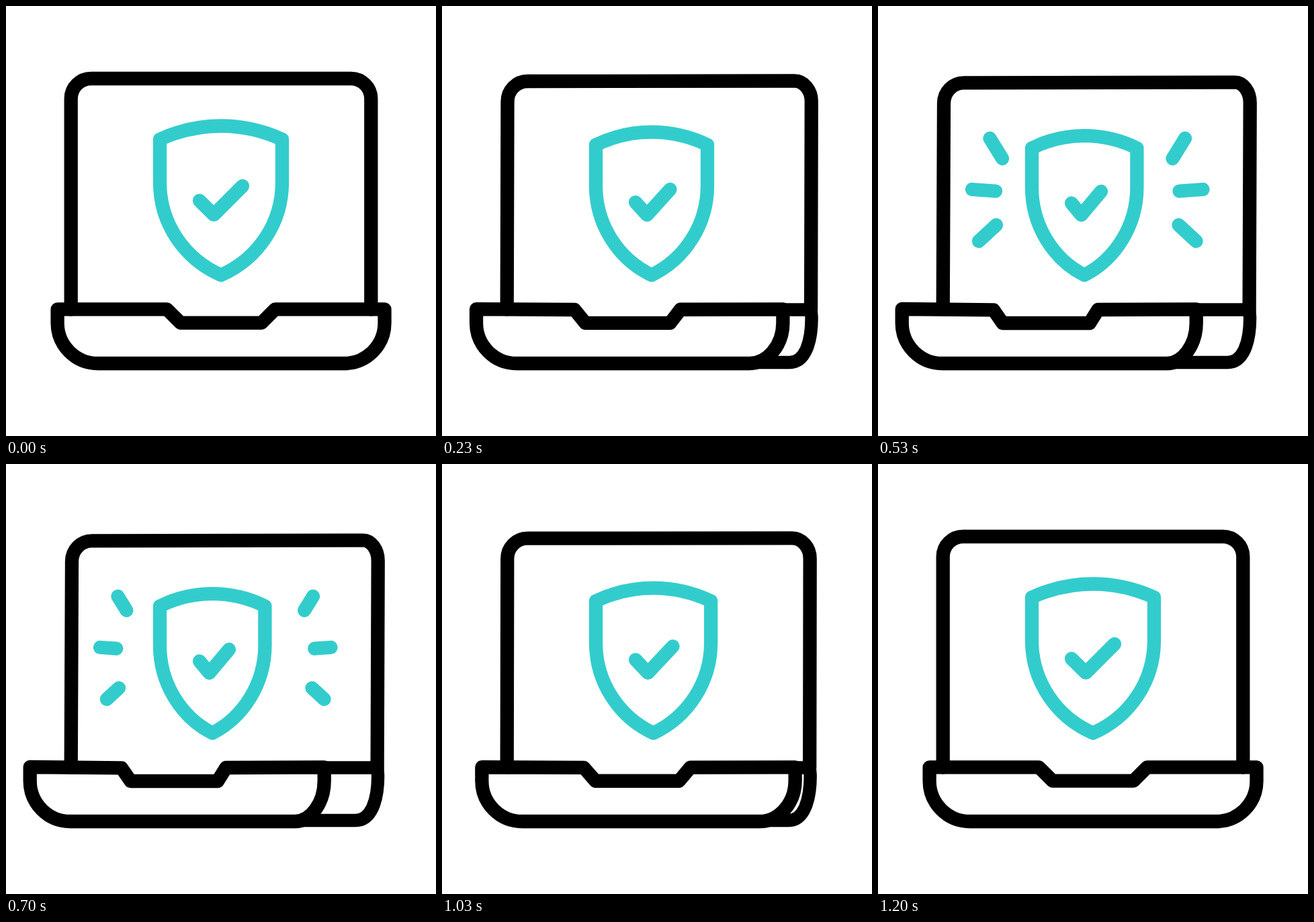
Write an HTML page that moves like this. It is 640x640 px and loops after 1670 ms.

```html
<!DOCTYPE html>
<html lang="en">
<head>
<meta charset="utf-8">
<title>Secure laptop</title>
<style>
  html, body { margin: 0; width: 100%; height: 100%; overflow: hidden; background: #fff; }
  svg { display: block; width: 100vw; height: 100vh; }
  path { fill: none; stroke: #000; stroke-width: 20.3; stroke-linecap: round; stroke-linejoin: round; }
  #back { stroke-width: 19.4; }
  #tray { fill: #fff; }
  .teal, .teal path { stroke: #3cc; }
</style>
</head>
<body>
<svg viewBox="0 0 640 640">
  <path id="back"/>
  <path id="tray"/>
  <path id="screen"/>
  <path id="shield" class="teal"/>
  <path id="check" class="teal"/>
  <path id="rays" class="teal"/>
</svg>
<script>
const LOOP = 1670, STEP = 100 / 3;

// Each part: path facing front, path turned aside (same commands).
const poses = {
  back: [
    'M420 452 L543.3 452 L544.3 464 C544.3 500 535 530.5 513 530.5 L420 530.5',
    'M420 452 L552.8 452 L553.6 464 C553.6 500 544 530.5 520 530.5 L420 530.5'],
  tray: [
    'M76.6 451.4 L239.5 451.4 L259.8 471.6 L380.3 471.6 L400.5 451.4 L563.5 451.4 L563.5 471.8 C563.5 505 536.6 532 503.5 532 L136.6 532 C103.5 532 76.6 505 76.6 471.8 Z',
    'M35.7 451 L172 452.4 L185.5 472 L315 472 L327.5 452 L473.7 451.4 L473.7 471.8 C473.7 505 453 532 430 532 L95.5 532 C62.5 532 35.7 505 35.7 471.8 Z'],
  screen: [
    'M96.7 451.4 L96.7 138 C96.7 121.4 110 108 126.7 108 L513.3 108 C530 108 543.3 121.4 543.3 138 L543.3 451.4',
    'M96.7 451.4 L98 145 C98 128 111 114.4 128 114.4 L531.5 113.6 C543.5 113.6 553.7 127.5 553.7 144 L552.6 451.8'],
  shield: [
    'M229 198.5 C257.5 185.5 288 178.5 320 178.5 C352 178.5 382.5 185.5 411 198.5 L411 262.5 C411 323 375 376.5 320 400.5 C265 376.5 229 323 229 262.5 Z',
    'M229 211.5 C253 199.5 280 193.2 307.2 193.2 C334.5 193.2 361 199.5 385.4 211.5 L385.4 270 C385.4 326 354 376.5 307.2 400.5 C260 376.5 229 326 229 270 Z'],
  check: [
    'M288 289.7 L309.3 310.7 L352 268',
    'M288 293.5 L302.6 311 L332 276']
};

// Left rays as inner point, outer point; the right side mirrors them.
const leftRays = [[185, 227, 166.5, 197], [175, 275.5, 140, 273], [176, 326, 150, 350]];
const mirror = ([x1, y1, x2, y2]) => [623.5 - x1, y1, 623.5 - x2, y2];
const allRays = [...leftRays, ...leftRays.map(mirror)];

const mix = (a, b, p) => a + (b - a) * p;
const ease = (t, from, to) => {
  const x = Math.min(1, Math.max(0, (t - from) / (to - from)));
  return x * x * (3 - 2 * x);
};
const set = (id, d) => document.getElementById(id).setAttribute('d', d);

function mixPath([from, to], p) {
  const target = to.match(/[\d.]+/g);
  let i = 0;
  return from.replace(/[\d.]+/g, n => mix(+n, +target[i++], p).toFixed(2));
}

function rayPath(start, end) {
  if (end <= 0 || start >= 1) return '';
  return allRays.map(([x1, y1, x2, y2]) => {
    const at = p => `${mix(x1, x2, p)} ${mix(y1, y2, p)}`;
    return `M${at(start)} L${at(end)}`;
  }).join('');
}

function draw(now) {
  // The motion is stepped at 30 pictures a second.
  const t = Math.floor((now % LOOP + 5) / STEP) * STEP;
  const turn = ease(t, 8, 394) - ease(t, 840, 1190);
  for (const id in poses) set(id, mixPath(poses[id], turn));
  set('rays', rayPath(ease(t, 630, 820), ease(t, 370, 530)));
  requestAnimationFrame(draw);
}

requestAnimationFrame(draw);
</script>
</body>
</html>
```
